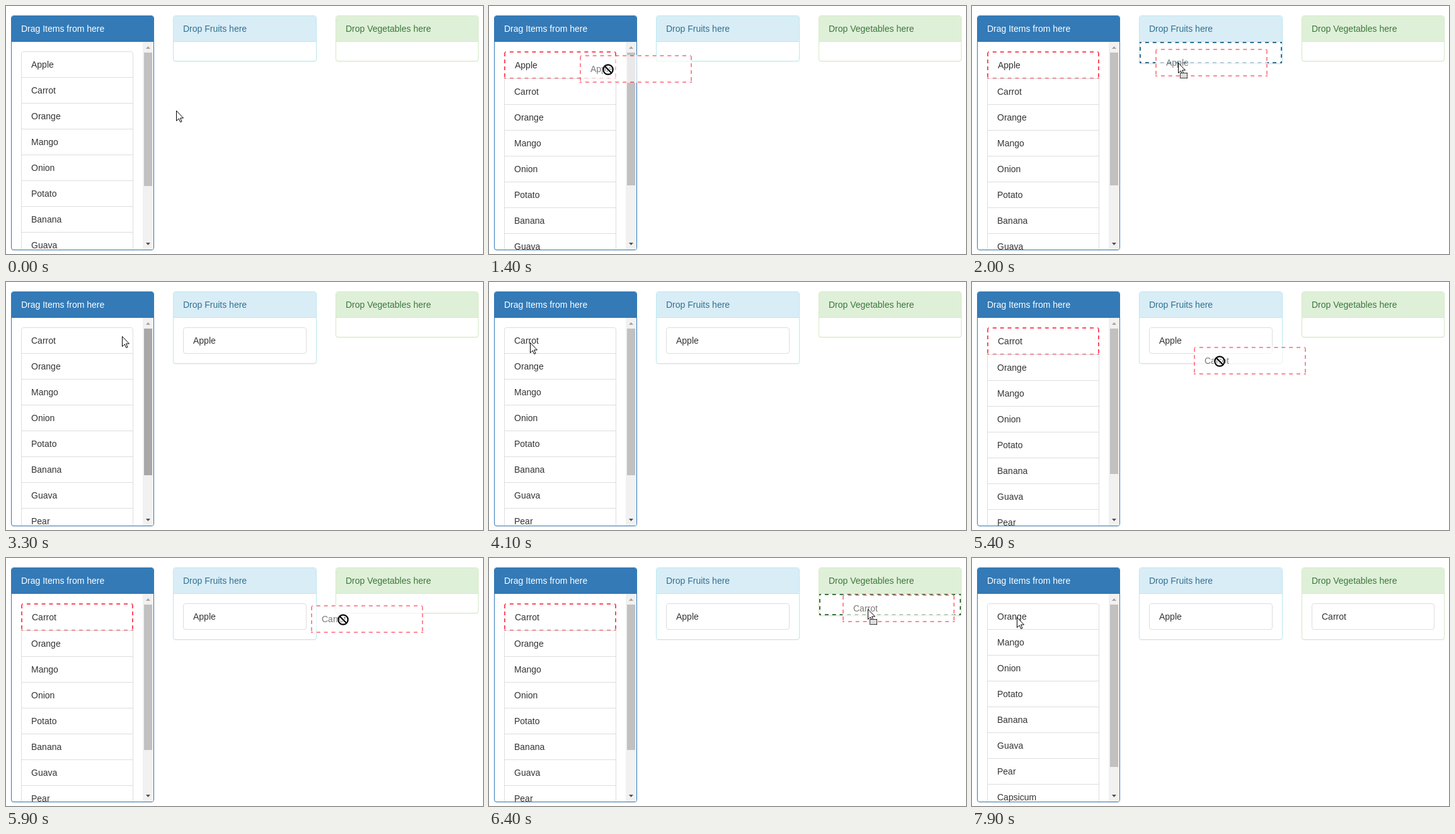
Animation of 757x394 px, one loop 8 s. Source, as an HTML page:

```html
<!DOCTYPE html>
<html lang="en">
<head>
<meta charset="utf-8">
<title>Drag and drop</title>
<style>
* { box-sizing: border-box; }
html, body { margin: 0; width: 100%; height: 100%; overflow: hidden; background: #fff; }
body { position: relative; font: 14px/20px "Liberation Sans", Arial, sans-serif; color: #333; }
.panel { position: absolute; top: 15px; border: 1px solid var(--line); border-radius: 4px; background: #fff; box-shadow: 0 1px 1px rgba(0,0,0,.05); }
.head { height: 41px; padding: 10px 15px; border-bottom: 1px solid var(--line); border-radius: 3px 3px 0 0; background: var(--fill); color: var(--ink); }
.body { position: relative; min-height: 30px; padding: 15px; }
#from { left: 8px; width: 227px; height: 373px; --line: #337ab7; --fill: #337ab7; --ink: #fff; }
#from .body { height: 330px; padding-right: 32px; overflow: hidden; border-radius: 0 0 3px 3px; }
#fruits { left: 265px; width: 228px; --line: #bce8f1; --fill: #d9edf7; --ink: #31708f; }
#veg { left: 523px; width: 227px; --line: #d6e9c6; --fill: #dff0d8; --ink: #3c763d; }
.item { position: relative; padding: 10px 15px; margin-bottom: -1px; border: 1px solid #ddd; background: #fff; }
.item:first-child { border-radius: 4px 4px 0 0; }
.item:last-child { margin-bottom: 0; }
.item:only-child { border-radius: 4px; }
/* Dashes are symmetric on each side, with a half dash at the corners. */
.dash {
  --stops: var(--dash) 0 25%, transparent 25% 75%, var(--dash) 75%;
  --h: linear-gradient(90deg, var(--stops));
  --v: linear-gradient(var(--stops));
  background: var(--h) top / 12px 2px round no-repeat, var(--h) bottom / 12px 2px round no-repeat,
    var(--v) left / 2px 12px no-repeat round, var(--v) right / 2px 12px no-repeat round, #fff;
}
.item.dash { --dash: #ff4a5c; border: 0; padding: 12px 17px; }
.body.dash { --dash: var(--ink); padding: 17px; }
#bar { position: absolute; left: 217px; top: 57px; width: 17px; height: 330px; background: #f1f1f1; border-radius: 0 0 3px 0; }
#thumb { position: absolute; left: 2px; top: 17px; width: 13px; background: #c1c1c1; }
#bar svg { position: absolute; left: 0; top: 0; }
#ghost { position: absolute; left: 0; top: 0; width: 178px; height: 44px; margin: 0; border-radius: 4px 4px 0 0; opacity: .65; }
#cursor { position: absolute; left: 0; top: 0; overflow: visible; }
</style>
</head>
<body>
<div class="panel" id="from"><div class="head">Drag Items from here</div><div class="body"></div></div>
<div class="panel" id="fruits"><div class="head">Drop Fruits here</div><div class="body"></div></div>
<div class="panel" id="veg"><div class="head">Drop Vegetables here</div><div class="body"></div></div>
<div id="bar">
  <div id="thumb"></div>
  <svg width="17" height="330"><path d="M5 11L8.5 7 12 11Z" fill="#a3a3a3"/><path d="M5 319L8.5 323 12 319Z" fill="#505050"/></svg>
</div>
<div id="ghost" class="item dash"></div>
<svg id="cursor" width="1" height="1">
  <defs>
    <g id="sign"><circle cy="1" r="7.7"/><path d="M-5.500-4.500L5.500 6.500"/></g>
  </defs>
  <g id="arrow">
    <path d="M.5 .5V16.500L4.300 13 6.800 18.500 9 17.500 6.600 12H11.500Z" fill="#fff" stroke="#000"/>
    <g id="move" shape-rendering="crispEdges">
      <rect x="3.500" y="16.500" width="11" height="8" fill="#ddd" stroke="#777"/>
      <path d="M3 16.500h12M3 24.500h12M3.500 16v9M14.500 16v9" stroke="#000" stroke-dasharray="1 1"/>
    </g>
  </g>
  <g id="deny" fill="none">
    <use href="#sign" stroke="#fff" stroke-width="4"/>
    <use href="#sign" stroke="#000" stroke-width="2.200"/>
  </g>
</svg>
<script>
const LOOP = 8000, STEP = 100, LAG = 25;
const NAMES = ['Apple', 'Carrot', 'Orange', 'Mango', 'Onion', 'Potato', 'Banana', 'Guava', 'Pear', 'Capsicum'];
const DRAGS = [
  { from: 1100, over: 2000, drop: 2700, grab: [36, 22], to: 'fruits' },
  { from: 4300, over: 6100, drop: 6900, grab: [40, 23], to: 'veg' }
];

// Turning points of the pointer: time, x, y.
const KEYS = [
  [100, 270, 166], [300, 206, 138], [800, 59, 94],
  [1000, 60, 94], [1400, 189, 100], [1700, 305, 99], [2000, 327, 90],
  [3000, 327, 90], [3300, 184, 86], [3500, 105, 74], [3900, 68, 100],
  [4200, 64, 95], [4500, 105, 117], [4600, 169, 125], [4900, 335, 145], [5200, 387, 128],
  [5400, 393, 125], [5700, 450, 108], [6000, 568, 92], [6300, 601, 81],
  [6900, 601, 81], [7200, 364, 177], [7500, 115, 114], [7900, 71, 94]
];

const $ = id => document.getElementById(id);
const body = id => $(id).querySelector('.body');
const show = (el, on) => { el.style.display = on ? '' : 'none'; };
const place = (el, x, y) => { el.style.transform = `translate(${Math.round(x)}px,${Math.round(y)}px)`; };
const item = (name, dash) => `<div class="item${dash ? ' dash' : ''}">${name}</div>`;

// Smooth curve through the keys that never overshoots them.
const rate = (i, k) => KEYS[i] && KEYS[i + 1] ? (KEYS[i + 1][k] - KEYS[i][k]) / (KEYS[i + 1][0] - KEYS[i][0]) : 0;
function slope(i, k) {
  const a = rate(i - 1, k), b = rate(i, k);
  return a * b > 0 ? 2 * a * b / (a + b) : 0;
}
function pointer(t) {
  const next = KEYS.findIndex(key => key[0] > t);
  if (next < 1) return KEYS.at(next).slice(1);
  const i = next - 1, a = KEYS[i], b = KEYS[next];
  const span = b[0] - a[0], u = (t - a[0]) / span, v = 1 - u;
  return [1, 2].map(k =>
    v * v * ((1 + 2 * u) * a[k] + u * span * slope(i, k)) +
    u * u * ((1 + 2 * v) * b[k] - v * span * slope(next, k)));
}

let shown = '';
function layout(done, drag, over) {
  const key = [done, !!drag, over].join();
  if (key === shown) return;
  shown = key;
  const left = NAMES.slice(done);
  body('from').innerHTML = left.map((name, i) => item(name, drag && i === 0)).join('');
  DRAGS.forEach((d, i) => {
    const box = body(d.to);
    box.innerHTML = i < done ? item(NAMES[i]) : '';
    box.classList.toggle('dash', over && d === drag);
  });
  const content = 51 + 41 * left.length + (drag ? 2 : 0);
  $('thumb').style.height = Math.round(296 * 330 / content) + 'px';
  $('ghost').textContent = left[0];
}

function draw(now) {
  const t = Math.floor(now % LOOP / STEP) * STEP;
  const done = DRAGS.filter(d => t >= d.drop).length;
  const drag = DRAGS.find(d => t >= d.from && t < d.drop);
  const over = !!drag && t >= drag.over;
  layout(done, drag, over);
  $('thumb').style.background = t >= 3200 && t < 3400 ? '#a8a8a8' : '';
  show($('ghost'), drag);
  if (drag) {
    const [x, y] = pointer(t - LAG);
    place($('ghost'), x - drag.grab[0], y - drag.grab[1]);
  }
  show($('arrow'), !drag || over);
  show($('move'), over);
  show($('deny'), drag && !over);
  place($('cursor'), ...pointer(t));
}

const start = performance.now();
function tick() {
  draw(performance.now() - start);
  requestAnimationFrame(tick);
}
tick();
</script>
</body>
</html>
```
